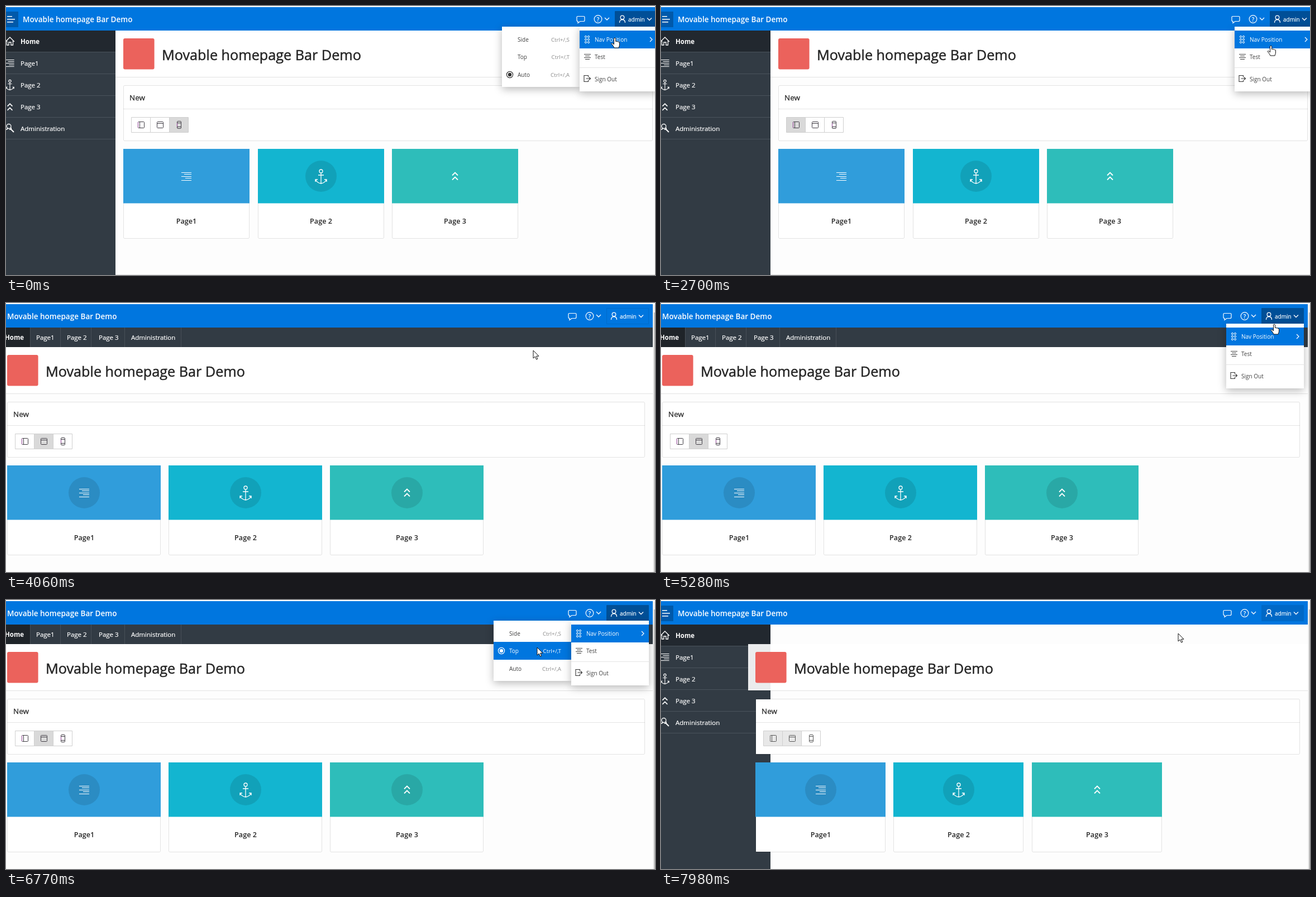
Animation of 1162 by 482 pixels, one loop 8 s. Source, as an HTML page with a canvas:

```html
<!DOCTYPE html>
<html lang="en">
<head>
<meta charset="utf-8">
<title>Navigation demo</title>
<style>
html, body { margin: 0; width: 100%; height: 100%; overflow: hidden; background: #fdfdfd; }
canvas { display: block; width: 1162px; height: 482px; }
</style>
</head>
<body>
<canvas id="stage" width="1162" height="482"></canvas>
<script>
const ctx = document.getElementById('stage').getContext('2d');
const LOOP = 8000;
const TITLE = 'Movable homepage Bar Demo';
const BLUE = '#0076df', DARK = '#323b44', LINE = 'rgba(0,0,0,.1)', INK = '#262626';
const PAGES = ['Page1', 'Page 2', 'Page 3'];

// Pointer moves: start, end, steps, target x, target y
const MOVES = [
  [150, 670, 5, 942, 56], [1380, 1500, 2, 939, 54], [1650, 2310, 6, 1101, 30],
  [2430, 2700, 3, 1092, 71], [2820, 2970, 2, 1085, 60], [3100, 3370, 3, 949, 82],
  [3490, 3490, 1, 944, 85], [4470, 5280, 7, 1098, 38], [5400, 5400, 1, 1095, 42],
  [5550, 5670, 2, 1090, 88], [5950, 6100, 2, 1085, 62], [6250, 6770, 4, 951, 85],
  [6920, 6920, 1, 950, 87], [7040, 7300, 3, 936, 112], [7430, 7580, 2, 926, 60]
];

function pointer(t) {
  let x = 1090, y = 57;
  for (const [from, to, steps, tx, ty] of MOVES) {
    if (t < from) break;
    const gap = steps > 1 ? (to - from) / (steps - 1) : 1;
    const p = Math.min(steps, Math.floor((t - from) / gap + 1.001)) / steps;
    x += (tx - x) * p;
    y += (ty - y) * p;
  }
  return { x: Math.round(x), y: Math.round(y) };
}

// Value of the last [start, value] pair reached
const at = (t, pairs) => pairs.filter(p => t >= p[0]).pop()[1];
const within = (t, a, b) => t >= a && t < b;

function state(t) {
  const scroll = t >= 3920;
  const s = {
    scroll,
    top: within(t, 3770, 7980),
    fading: t >= 7980,
    left: at(t, [[0, 196], [3920, 30], [4060, -12], [7980, 155.5]]),
    dy: scroll ? 35 : 0,
    shift: scroll ? -15 : 0,
    edge: scroll ? 1158 : 1162,
    choice: at(t, [[0, 2], [1380, 0], [3770, 1], [7980, 0]]),
    greys: at(t, [[0, [255, 255, 217]], [1380, [241, 255, 230]], [1500, [227, 255, 242]],
      [1650, [217, 255, 255]], [3920, [232, 232, 255]], [4060, [255, 217, 255]], [7980, [232, 232, 255]]]),
    discs: at(t, [[0, [0, 1, 0]], [3770, [1, 1, 1]], [7980, [1, 1, 0]]]),
    menu: t < 1380 || within(t, 2430, 3770) || within(t, 5280, 7980),
    sub: t < 1380 || within(t, 2820, 3770) || within(t, 6100, 7980),
    cur: pointer(t)
  };
  const overAdmin = s.cur.x >= 1090 + s.shift && s.cur.y <= 38;
  s.hand = overAdmin || (s.menu && s.cur.x >= 1027 + s.shift);
  s.admin = s.menu || within(t, 3770, 3920) ? '#004f97'
    : overAdmin || within(t, 3920, 4060) || s.fading ? '#0068c6' : BLUE;
  return s;
}

function rect(x, y, w, h, fill) {
  ctx.fillStyle = fill;
  ctx.fillRect(x, y, w, h);
}

// Fill stays inside the one pixel border
function box(x, y, w, h, fill, line, r = 0) {
  if (fill) rect(x + 1, y + 1, w - 2, h - 2, fill);
  ctx.beginPath();
  ctx.roundRect(x + .5, y + .5, w - 1, h - 1, r);
  ctx.strokeStyle = line;
  ctx.lineWidth = 1;
  ctx.stroke();
}

// Weight 500 is regular type thickened by a hairline
function text(str, x, y, size, color, weight = 400, align = 'left') {
  const medium = weight === 500;
  ctx.font = `${medium ? 400 : weight} ${size}px "Open Sans", "Noto Sans", sans-serif`;
  ctx.textAlign = align;
  ctx.fillStyle = ctx.strokeStyle = color;
  ctx.fillText(str, x, y);
  if (medium) {
    ctx.lineWidth = size * .02;
    ctx.strokeText(str, x, y);
  }
}

function path(d, x, y, color, width = 1, fill, scale = 1) {
  ctx.save();
  ctx.translate(x, y);
  ctx.scale(scale, scale);
  const p = new Path2D(d);
  if (fill) { ctx.fillStyle = fill; ctx.fill(p); }
  ctx.strokeStyle = color;
  ctx.lineWidth = width;
  ctx.stroke(p);
  ctx.restore();
}

function disc(x, y, r, fill, line, width = 1) {
  ctx.beginPath();
  ctx.arc(x, y, r, 0, Math.PI * 2);
  if (fill) { ctx.fillStyle = fill; ctx.fill(); }
  if (line) { ctx.strokeStyle = line; ctx.lineWidth = width; ctx.stroke(); }
}

const icon = {
  lines(x, y, k = 1) {
    [18, 13, 18, 11, 18].forEach((w, i) =>
      rect(x + (9 - w) * k, Math.round(y - 7.5 * k + i * 3.6 * k), w * k, 1, '#fff'));
  },
  anchor(x, y, k = 1) {
    path('M0 -6V13 M-5 -2H5 M-10 6Q-7 12 0 13Q7 12 10 6 M-10 10V6H-6 M10 10V6H6 M3 -9A3 3 0 1 1 -3 -9A3 3 0 1 1 3 -9',
      x, y, '#fff', 1.3 / Math.sqrt(k), null, k);
  },
  up(x, y, k = 1) {
    path('M-5 -1.5L0 -6.5L5 -1.5M-5 6.5L0 1.5L5 6.5', x, y, '#fff', 1.8, null, k);
  },
  home(x, y) {
    path('M-8 1L0 -7L8 1M-5.5 -1V7H-2V2H2V7H5.5V-1', x, y, '#fff', 1.3);
  },
  wrench(x, y) {
    disc(x - 2, y - 3.5, 4, null, '#fff', 1.3);
    path('M-9 7Q-8 1 -3 1', x, y, '#fff', 1.3);
    path('M2 2L7 7M2 -1V2H-1', x, y, '#fff', 2);
  },
  person(x, y, color) {
    disc(x, y - 3, 3.3, null, color, 1.3);
    path('M-5 6.5Q-5 1 0 1Q5 1 5 6.5', x, y, color, 1.3);
  }
};
const CARD_ICONS = [icon.lines, icon.anchor, icon.up];

function sidebar() {
  rect(0, 44, 196, 438, DARK);
  rect(0, 44, 196, 38, '#22282f');
  for (let i = 1; i <= 5; i++) rect(0, 43 + i * 39, 196, 1, '#4a535c');
  ['Home', ...PAGES, 'Administration'].forEach((label, i) =>
    text(label, 26, 67.5 + i * 39, 11.5, '#fff', i ? 500 : 700));
  icon.home(7, 63);
  icon.lines(7, 102, .85);
  icon.anchor(7, 141, .72);
  icon.up(7, 181, .9);
  icon.wrench(7, 219);
}

function topNav(edge) {
  rect(0, 44, edge, 35, DARK);
  rect(0, 44, 43, 35, '#1f2429');
  for (const x of [43, 97, 152, 212, 313]) rect(x, 44, 1, 35, '#474f57');
  const xs = [-2, 54, 109, 166, 224];
  ['Home', ...PAGES, 'Administration'].forEach((label, i) =>
    text(label, xs[i], 66, 11.5, '#fff', i ? 500 : 700));
}

function header(s) {
  rect(0, 0, 1162, 2, '#fff');
  rect(0, 2, s.edge, 42, BLUE);
  if (!s.top) {
    rect(0, 10, 22, 28, '#0059aa');
    [9, 14, 11].forEach((w, i) => rect(2, 18 + i * 5, w, 1.5, '#fff'));
  }
  text(TITLE, s.top ? 2 : 30, 29, 13.5, '#fff', 600);
  const x = s.shift;
  path('M-5 -5H5Q7 -5 7 -3V2Q7 4 5 4H-1L-5 7V4Q-7 4 -7 2V-3Q-7 -5 -5 -5Z', 1029 + x, 23.5, '#fff', 1.2);
  disc(1060 + x, 23.5, 6.8, null, '#fff', 1.2);
  text('?', 1060 + x, 27.5, 10, '#fff', 600, 'center');
  path('M-4 -2L0 2L4 -2', 1076 + x, 23, '#fff', 1.3);
  box(1090 + x, 9, 76, 29, s.admin, s.admin === BLUE ? '#006bcb' : s.admin);
  icon.person(1103.5 + x, 23.5, '#fff');
  text('admin', 1114 + x, 27.5, 10, '#fff', 500);
  path('M-4 -2L0 2L4 -2', 1152 + x, 23.5, '#fff', 1.3);
}

function toggles(x, y, s) {
  const side = s.fading ? '#666' : '#8d3f91', ink = s.fading ? '#555' : '#403c44';
  s.greys.forEach((g, i) => box(x + i * 34, y, 35, 28, `rgb(${g},${g},${g})`, '#cfcfcf'));
  box(x + 12, y + 8, 12, 12, null, ink, 1);
  rect(x + 15, y + 8, 1, 12, ink);
  rect(x + 12, y + 9, 1, 10, side);
  box(x + 46, y + 8, 12, 12, null, ink, 1);
  rect(x + 46, y + 11, 12, 1, ink);
  box(x + 82, y + 7, 8, 14, null, ink, 1.5);
  rect(x + 82, y + 10, 8, 1, ink);
  rect(x + 82, y + 17, 8, 1, ink);
  rect(x + 82, y + 11, 1, 6, side);
}

function content(s) {
  const { dy } = s, left = Math.round(s.left), x = Math.floor(s.left + 14);
  const w = (s.scroll ? 1144 : 1158) - x;
  rect(left, 44 + dy, s.edge - left, 83, 'rgba(255,255,255,.9)');
  rect(left, 127 + dy, s.edge - left, 1, LINE);
  ctx.beginPath();
  ctx.roundRect(x, 58 + dy, 55.6, 55.6, 3);
  ctx.fillStyle = '#eb625c';
  ctx.fill();
  text(TITLE, x + 69, 97 + dy, 25.2, INK, 500);

  box(x, 142 + dy, w, 100, '#fff', LINE, 2);
  rect(x, 184 + dy, w, 1, LINE);
  text('New', x + 11, 169 + dy, 13.5, INK, 500);
  toggles(x + 14, 199 + dy, s);

  const pitch = (w + 14) / 4, cw = Math.floor(pitch - 14);
  ['#309ddb', '#13b5d0', '#2ebdba'].forEach((color, i) => {
    const cx = Math.round(x + i * pitch), mid = cx + Math.round(cw / 2);
    box(cx, 256 + dy, cw, 161, '#fff', LINE, 2);
    rect(cx, 256 + dy, cw, 97.5, color);
    if (s.discs[i]) disc(mid, 305 + dy, 28, 'rgba(0,0,0,.11)');
    CARD_ICONS[i](mid, 305 + dy);
    text(PAGES[i], mid, 390 + dy, 12.6, INK, 600, 'center');
  });
  if (!s.scroll) rect(196, 481, 966, 1, LINE);
}

function panel(x, h) {
  ctx.save();
  ctx.shadowColor = 'rgba(0,0,0,.28)';
  ctx.shadowBlur = 14;
  ctx.shadowOffsetY = 4;
  rect(x, 37, 139, h, '#fff');
  ctx.restore();
}

function submenu(s, x) {
  panel(x, 108);
  const hot = s.cur.x < x + 139 ? Math.floor((s.cur.y - 44) / 31.3) : -1;
  ['Side', 'Top', 'Auto'].forEach((label, i) => {
    const y = 60 + Math.round(i * 31.3), on = i === hot;
    if (on) rect(x, y - 16, 139, 32, BLUE);
    text(label, x + 28, y + 4, 10, on ? '#fff' : '#404040');
    text('Ctrl+/,' + label[0], x + 121, y + 4, 9.8, on ? '#fff' : '#8a8a8a', 400, 'right');
    if (i === s.choice) {
      const ink = on ? '#fff' : '#303030';
      disc(x + 14, y, 5.6, null, ink, 1.2);
      disc(x + 14, y, 3.2, ink);
    }
  });
}

function menu(s, x) {
  panel(x, 116);
  const test = s.cur.x >= x && within(s.cur.y, 76, 108);
  rect(x, test ? 76 : 44, 139, 32, BLUE);
  const navInk = test ? '#404040' : '#fff', testInk = test ? '#fff' : '#404040';
  text('Nav Position', x + 27, 64, 10, navInk);
  for (let i = 0; i < 6; i++)
    disc(x + 11 + (i % 2) * 5, 55 + (i >> 1) * 5, 1.6, null, navInk, 1);
  path('M-2 -4L2 0L-2 4', x + 128, 60, navInk, 1.2);
  text('Test', x + 27, 95, 10, testInk);
  [12, 8, 12, 8].forEach((w, i) => rect(x + 14 - w / 2, 86 + i * 3, w, 1, testInk));
  rect(x, 110, 139, 1, LINE);
  text('Sign Out', x + 27, 134.5, 10, '#404040');
  path('M2 -2.5V-5.5H-5.5V5.5H2V2.5M-2 0H6M3.5 -2.5L6 0L3.5 2.5', x + 13.5, 130, '#333', 1.1);
}

function cursor({ x, y }, hand) {
  if (hand)
    path('M-1.5 1Q0 -1 1.5 1V6.5Q3 5.5 4 7Q5.5 6 6.5 7.5Q8.5 7 8.5 9V13Q8 15 7 18H-1Q-2 15 -6 10.5Q-5.5 8.5 -3.5 10L-1.5 12Z',
      x, y, '#111', 1, '#fff');
  else
    path('M0 0V14L3.3 11L5.6 16.2L7.8 15.2L5.6 10.2H10Z', x, y, '#111', 1, '#fff');
}

function draw(t) {
  const s = state(t);
  rect(0, 0, 1162, 482, '#fdfdfd');
  if (!s.top) sidebar();
  content(s);
  header(s);
  if (s.top) topNav(s.edge);
  if (s.scroll) {
    rect(1158, 3, 4, 479, '#f1f1f1');
    rect(1160, 17, 2, 465, '#bdbdbd');
  }
  const x = 1027 + s.shift;
  if (s.sub) submenu(s, x - 139);
  if (s.menu) menu(s, x);
  cursor(s.cur, s.hand);
}

const start = performance.now();
function tick() {
  draw((performance.now() - start) % LOOP);
  requestAnimationFrame(tick);
}
tick();
</script>
</body>
</html>
```
